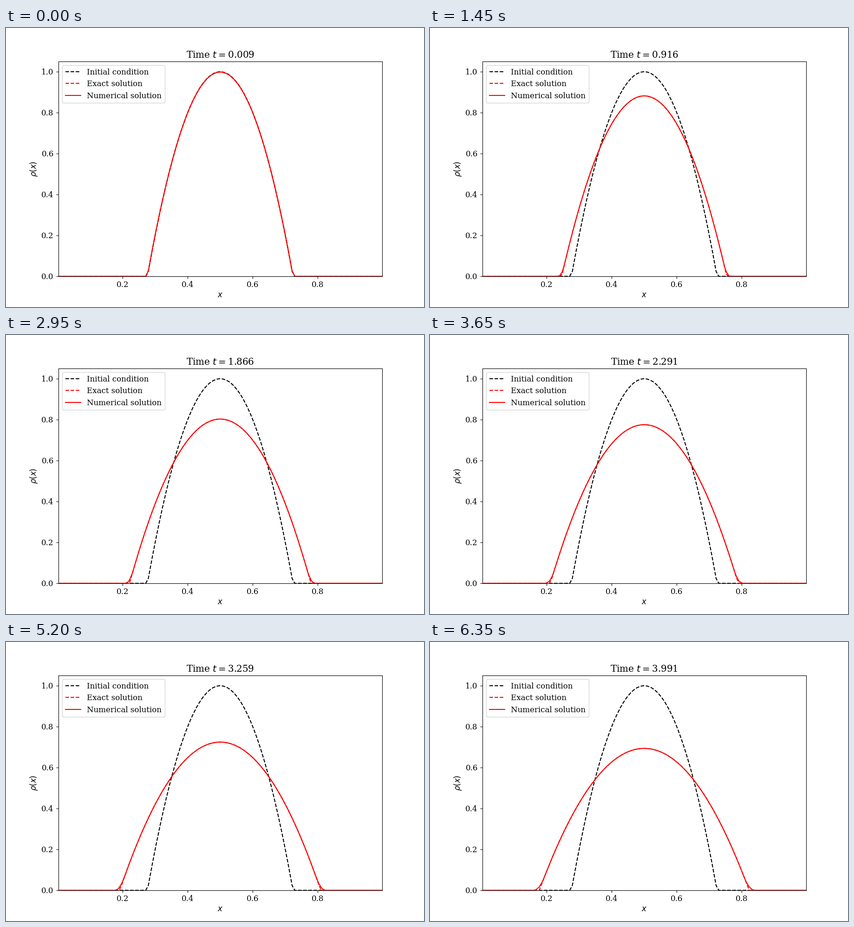
A matplotlib script for the animation above (6.4 s loop, 900 by 600 pixels).

```python
import numpy as np
import matplotlib.pyplot as plt
from matplotlib.animation import FuncAnimation

plt.rcParams.update({"font.family": "DejaVu Serif", "font.size": 12})

FRAMES, INTERVAL = 128, 50
CELLS, DT = 32, 0.025
R0_SQ, T0 = 0.05, 2.0

# Gauss points of a uniform mesh on [0, 1]
xi, _ = np.polynomial.legendre.leggauss(4)
x = ((np.arange(CELLS)[:, None] + (xi + 1) / 2) / CELLS).ravel()


def profile(t):
    """Self-similar parabola before it is cut off at zero."""
    s = (1 + t / T0) ** (1 / 3)
    return (1 - (x - 0.5) ** 2 / (R0_SQ * s**2)) / s


def exact(t):
    return np.maximum(profile(t), 0)


def numerical(t):
    """Profile with the front smeared by the scheme."""
    u = profile(t)
    w = 0.07 * (1 - np.exp(-t / 0.2)) + 1e-6
    return np.where(np.abs(u) < w, (u + w) ** 2 / (4 * w), np.maximum(u, 0))


def frame_time(k):
    step = (5 * k + 2) // 4
    node = 0.3574 if step % 10 == 0 else 0.6426
    return DT * (step + node)


fig, ax = plt.subplots(figsize=(9, 6), dpi=100)
ax.plot(x, exact(0), "k--", label="Initial condition")
exact_line, = ax.plot(x, exact(0), "r--", label="Exact solution")
num_line, = ax.plot(x, exact(0), "r-", label="Numerical solution")
ax.set_xlim(x[0], x[-1])
ax.set_ylim(0, 1.05)
ax.set_xlabel("$x$")
ax.set_ylabel(r"$\rho(x)$")
ax.legend(loc="upper left")
title = ax.set_title("")


def update(k):
    t = frame_time(k)
    exact_line.set_ydata(exact(t))
    num_line.set_ydata(numerical(t))
    title.set_text(f"Time $t=${t:.3f}")
    return exact_line, num_line, title


anim = FuncAnimation(fig, update, frames=FRAMES, interval=INTERVAL,
                     repeat=True, repeat_delay=0)
plt.show()
```
